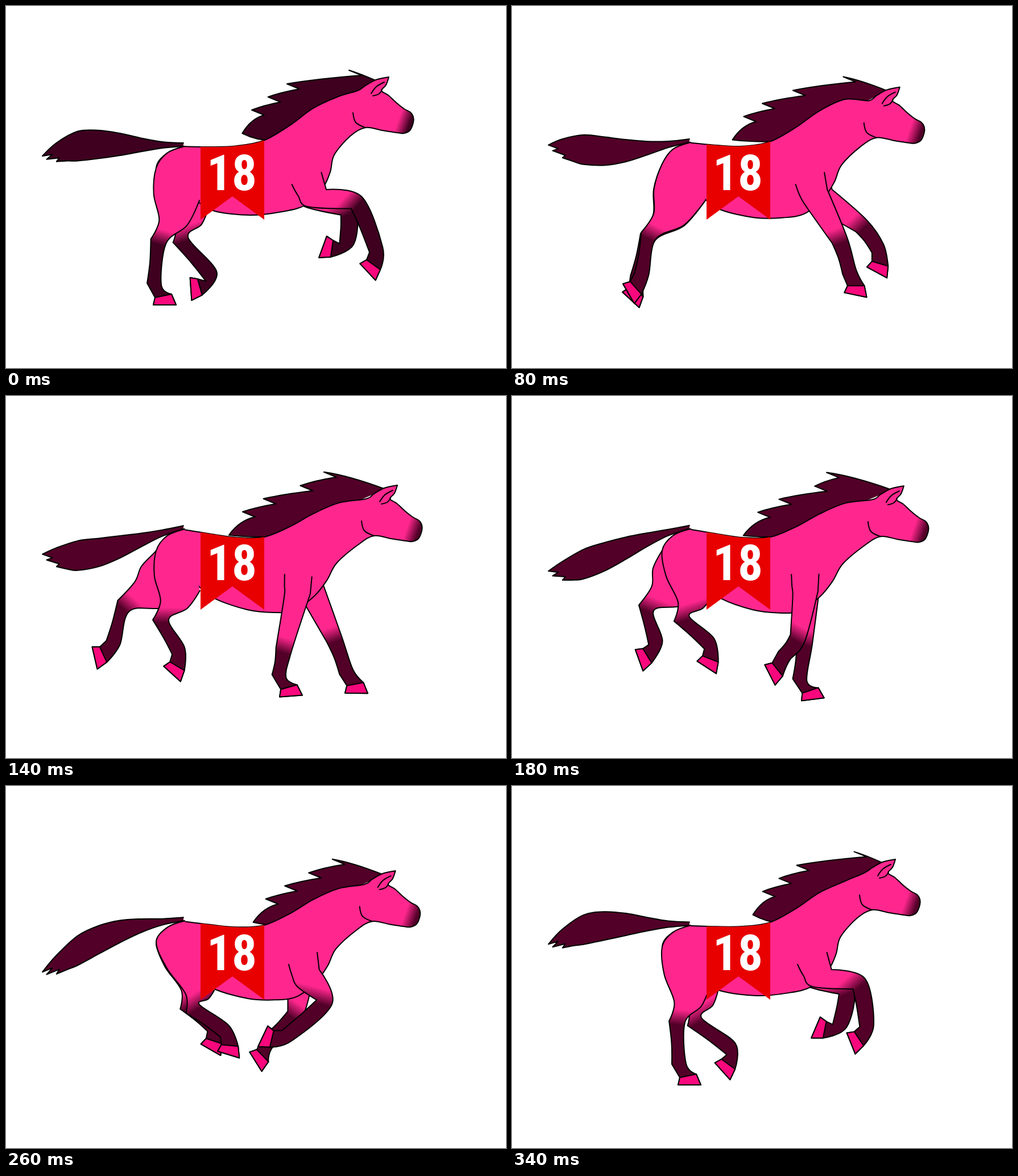
Recreate the animation shown at these times as an HTML page with a canvas. Size 879x637 px, loop 0.36 s.

```html
<!DOCTYPE html>
<html lang="en">
<head>
<meta charset="utf-8">
<title>Galloping horse</title>
<style>
html, body { margin: 0; height: 100%; overflow: hidden; background: #fff; }
canvas { display: block; }
</style>
</head>
<body>
<canvas id="stage" width="879" height="637"></canvas>
<script>
const ctx = document.getElementById('stage').getContext('2d');
const LOOP = 360, STEP = 20;
const PINK = '#ff278e', HOOF = '#f8087c', RED = '#e80000';

// Key poses of the gallop at these times, in ms.
const TIMES = [0, 40, 100, 140, 220, 300, 340];
// Head shift x, y and arch of the neck.
const BOB = [[0, 0, 2], [4, 7, -7], [11, 23, -7], [15, 32, 3], [15, 31, 1], [7, 15, 4], [1, 4, 7]];
// Knee x, y, middle of the sole x, y and tilt of the sole in degrees.
const HIND_NEAR = [
  [268, 414, 279, 526, 0], [238, 424, 212, 525, 0], [246, 395, 216, 497, 81], [272, 394, 292, 489, 42],
  [319, 391, 377, 470, 28], [326, 397, 383, 485, 6], [290, 415, 312, 526, 0]];
const HIND_FAR = [
  [307, 412, 325, 498, 86], [285, 423, 316, 525, 0], [218, 396, 162, 506, 68], [207, 369, 156, 461, 77],
  [274, 382, 299, 474, 57], [353, 393, 402, 459, 10], [321, 415, 370, 502, 48]];
const FORE_NEAR = [
  [616, 346, 636, 468, 47], [620, 372, 665, 473, 27], [549, 431, 567, 524, 5], [488, 447, 501, 528, -4],
  [531, 401, 429, 454, 122], [589, 361, 502, 438, 88], [610, 348, 596, 453, 68]];
const FORE_FAR = [
  [601, 361, 557, 424, 110], [623, 371, 594, 436, 92], [606, 398, 655, 487, 2], [577, 428, 616, 523, 1],
  [472, 428, 455, 527, 0], [563, 376, 456, 437, 120], [588, 361, 534, 425, 113]];

// Resting outline of the body.
const TOPLINE = [[308, 247], [360, 248], [405, 246], [453, 236], [500, 208], [540, 178], [585, 157]];
const HEAD = [
  [618, 149], [632, 140], [650, 130], [673, 125], [668, 139], [660, 149], [672, 157], [686, 170],
  [700, 181], [711, 187], [716, 195], [716, 205], [710, 219], [699, 224], [688, 223], [662, 219], [632, 214]];
const UNDERLINE = [
  [605, 229], [577, 262], [570, 292], [557, 320], [527, 350], [485, 362], [430, 368], [367, 361], [336, 343]];
const EAR_TIP = TOPLINE.length + 3;
// Mane strands: resting tip x, y and lag of the sway in degrees.
const STRANDS = [[411, 224, 280], [432, 183, 270], [465, 160, 260], [513, 137, 220], [578, 113, 0]];

const clamp = (v, lo, hi) => Math.min(hi, Math.max(lo, v));
const add = (p, v, k = 1) => [p[0] + v[0] * k, p[1] + v[1] * k];
const mid = (a, b) => [(a[0] + b[0]) / 2, (a[1] + b[1]) / 2];
const rearOf = v => [-v[1], v[0]];
const unit = (a, b) => {
  const d = add(b, a, -1), length = Math.hypot(...d);
  return [d[0] / length, d[1] / length];
};
const wave = (t, lag) => Math.cos((t / LOOP * 360 - lag) * Math.PI / 180);

// Periodic cubic Hermite interpolation between key rows.
function sample(rows, t) {
  const n = TIMES.length, i = TIMES.findLastIndex(key => key <= t);
  const key = k => {
    const turn = Math.floor((i + k) / n), j = i + k - turn * n;
    return [TIMES[j] + turn * LOOP, rows[j]];
  };
  const [[tp, P], [ta, A], [tb, B], [tn, N]] = [-1, 0, 1, 2].map(key);
  const span = tb - ta, u = (t - ta) / span, s = u * u * (3 - 2 * u);
  const leave = u * (1 - u) ** 2 * span / (tb - tp), arrive = u * u * (u - 1) * span / (tn - ta);
  return A.map((a, j) => a + (B[j] - a) * s + (B[j] - P[j]) * leave + (N[j] - a) * arrive);
}

// Smooth path through the points, sharp at the listed corners.
function curve(pts, corners = []) {
  const path = new Path2D(), last = pts.length - 1;
  const tangent = i => i <= 0 || i >= last || corners.includes(i) ? [0, 0]
    : [0, 1].map(k => (pts[i + 1][k] - pts[i - 1][k]) / 6);
  path.moveTo(...pts[0]);
  for (let i = 0; i < last; i++) {
    path.bezierCurveTo(...add(pts[i], tangent(i)), ...add(pts[i + 1], tangent(i + 1), -1), ...pts[i + 1]);
  }
  return path;
}

function paint(path, fill) {
  ctx.fillStyle = fill;
  ctx.fill(path);
  ctx.stroke(path);
}

function shade(from, to, dark) {
  const g = ctx.createLinearGradient(...from, ...to);
  g.addColorStop(0, PINK);
  g.addColorStop(1, dark);
  return g;
}

// Thigh: rump and flank follow the hock.
function thigh(knee, kneeRear, kneeFront, rock) {
  const above = add(kneeRear, [13 - (knee[0] - 275) * .25, -33]);
  const rump = [264, 285 + rock], reach = clamp(knee[0] - 270, 0, 60);
  const flank = [340 + reach * .45, 342 + reach * .3];
  const bulge = rearOf(add(kneeFront, flank, -1));
  return {
    rear: [[314, 247 + rock], [283, 259 + rock], rump, add(mid(rump, above), [-7, 0]), above],
    front: [add(mid(kneeFront, flank), bulge, -.1), flank]
  };
}

// Shoulder: elbow and breast follow the knee.
function shoulder(knee) {
  const x = knee[0], start = [500 + (x - 590) * .1, 314];
  const breast = [551 + (x - 590) * .13, 293 + Math.max(0, 560 - x) * .35];
  const elbow = [start[0] + 24 + (x - 600) * .22, 353];
  return {
    rear: [start, [start[0] * .6 + elbow[0] * .4, 334], elbow],
    front: [add(breast, [(x - 520) * .09, 30]), breast]
  };
}

function drawLeg(rows, t, isFore, rock, dark) {
  const [kx, ky, hx, hy, tilt] = sample(rows, t), angle = tilt * Math.PI / 180;
  const knee = [kx, ky], sole = [hx, hy];
  const forward = [Math.cos(angle), Math.sin(angle)], down = rearOf(forward);
  const fetlock = add(add(sole, forward, -19), down, -37);
  const shin = unit(knee, fetlock);
  const bend = unit([0, 0], add(shin, unit(isFore ? [540, 325] : [315, 320], knee)));
  const kneeRear = add(knee, rearOf(bend), 14), kneeFront = add(knee, rearOf(bend), -14);
  const upper = isFore ? shoulder(knee) : thigh(knee, kneeRear, kneeFront, rock);
  const hoof = [[-17, -13], [-20, 0], [20, 0], [12, -19]]
    .map(([x, y]) => add(add(sole, forward, x), down, y));
  const outline = [
    ...upper.rear, kneeRear, add(mid(knee, fetlock), rearOf(shin), 11), add(fetlock, rearOf(shin), 12),
    ...hoof, add(fetlock, rearOf(shin), -13), kneeFront, ...upper.front
  ];
  const n = upper.rear.length, corners = [n, n + 2, n + 3, n + 4, n + 5, n + 6];
  if (isFore) corners.push(outline.length - 2);
  paint(curve(outline, corners), shade(add(knee, bend, -22), add(knee, bend, 5), dark));
  const shoe = curve(hoof, [1, 2]);
  shoe.closePath();
  paint(shoe, HOOF);
}

// A travelling wave that grows towards the ragged tip.
function drawTail(t, rock, dark) {
  const at = (s, offset) => {
    const y = 244 + s ** 1.5 * (42 + 44 * wave(t, 120 + 120 * s)) + rock * (1 - s) ** 3;
    return [312 - 248 * s, y + offset];
  };
  const half = s => 3 + 23 * Math.sin(Math.PI / 2 * Math.min(1, s / .7)) ** 2;
  const along = [0, .15, .3, .45, .6, .75];
  const ragged = [[.9, -14], [1, 0], [.93, 4], [.97, 9], [.88, 14], [.9, 19], [.82, 23]];
  const outline = [
    ...along.map(s => at(s, -half(s))), ...ragged.map(([s, y]) => at(s, y)),
    ...along.reverse().map(s => at(s, half(s)))
  ];
  paint(curve(outline, [7, 8, 9, 10, 11]), dark);
}

function drawMane(t, dx, dy, withers, dark) {
  const tips = STRANDS.map(([x, y, lag]) => [x + 25 * wave(t, lag), y + dy * .65]);
  const path = new Path2D();
  path.moveTo(470, withers);
  path.quadraticCurveTo(tips[0][0] + 25, withers, ...tips[0]);
  tips.forEach((tip, i) => {
    const next = tips[i + 1], end = next ? add(next, [22, 9]) : [652 + dx, 132 + dy];
    path.quadraticCurveTo(tip[0] + .4 * (end[0] - tip[0]), Math.min(tip[1], end[1]) + 6, ...end);
    if (next) path.lineTo(...next);
  });
  paint(path, dark);
}

function drawFlag(body) {
  const area = new Path2D(body);
  area.rect(342, 300, 112, 76);
  ctx.save();
  ctx.clip(area);
  ctx.fillStyle = RED;
  ctx.fill(new Path2D('M342 220H454V376L398 335L342 376Z'));
  ctx.restore();
  ctx.fillStyle = '#fff';
  ctx.font = 'bold 87px "Roboto Condensed", "Open Sans Condensed", Roboto, sans-serif';
  ctx.textAlign = 'center';
  ctx.fillText('18', 397, 324);
}

function draw(t) {
  const [dx, dy, arch] = sample(BOB, t), rock = -.4 * dy;
  const dark = t < 60 ? '#3f0020' : '#520028';
  const onHead = pts => pts.map(p => add(p, [dx, dy]));
  // The trunk rocks about a point under the flag.
  const weight = x => clamp((x - 390) / 160, -.45, 1);
  const topline = TOPLINE.map(([x, y]) => [x, y + .88 * weight(x) * dy + arch * Math.max(0, weight(x))]);
  const underline = UNDERLINE.map(([x, y]) => {
    const lean = clamp((275 - y) / 45, -1.6, 1) * Math.max(0, weight(x));
    return [x + lean * dx, y + weight(x) * dy];
  });

  ctx.fillStyle = '#fff';
  ctx.fillRect(0, 0, 879, 637);
  ctx.lineWidth = 2;
  ctx.lineJoin = ctx.lineCap = 'round';
  ctx.strokeStyle = '#000';

  drawLeg(HIND_FAR, t, false, rock, dark);
  drawLeg(FORE_FAR, t, true, rock, dark);
  drawTail(t, rock, dark);
  drawMane(t, dx, dy, topline[3][1], dark);

  const edge = curve([...topline, ...onHead(HEAD), ...underline], [EAR_TIP]);
  const body = new Path2D(edge);
  body.lineTo(290, 300);
  body.lineTo(300, 262);
  body.closePath();
  ctx.fillStyle = shade([690 + dx, 199 + dy], [710 + dx, 206 + dy], dark);
  ctx.fill(body);
  ctx.stroke(edge);

  drawLeg(HIND_NEAR, t, false, rock, dark);
  drawLeg(FORE_NEAR, t, true, rock, dark);

  ctx.stroke(curve(onHead([[642, 154], [651, 142], [665, 134]])));
  ctx.stroke(curve(onHead([[645, 158], [655, 155], [661, 148]])));
  ctx.stroke(curve(onHead([[610, 188], [615, 205], [632, 214]])));
  drawFlag(body);
}

function frame(now) {
  draw(Math.floor(now % LOOP / STEP) * STEP);
  requestAnimationFrame(frame);
}
requestAnimationFrame(frame);
</script>
</body>
</html>
```
